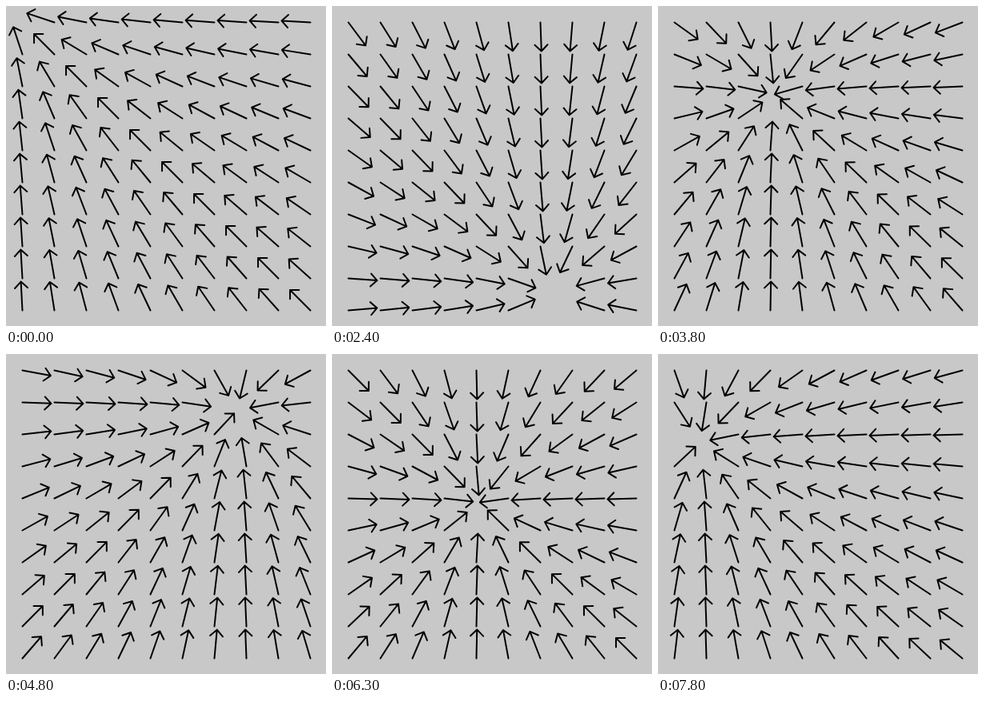
An HTML page with a canvas for the animation above (8 s loop, 400x400 px).

```html
<!DOCTYPE html>
<html>
<head>
<meta charset="utf-8">
<title>Arrow field</title>
<style>
html, body { margin: 0; width: 100%; height: 100%; overflow: hidden; background: #c8c8c8; }
canvas { display: block; }
</style>
</head>
<body>
<canvas width="400" height="400"></canvas>
<script>
const ctx = document.querySelector('canvas').getContext('2d');
const LOOP = 8000, STEP = 100, GAP = 40, LENGTH = 36, HEAD = 8;

// Pointer moves from (0, 0): first step, last step, end point. It rests in between.
const moves = [
  [4, 10, 275, 230], [15, 16, 373, 300], [16, 19, 365, 364], [21, 30, 86.5, 347],
  [32, 38, 145, 110], [38, 40, 185, 62], [43, 48, 288, 70], [48, 52, 300, 306],
  [53, 63, 184, 185], [63, 69, 312, 80], [70, 78, 52, 110]
];

function pointer(step) {
  let x = 0, y = 0;
  for (const [from, to, endX, endY] of moves) {
    const k = Math.min(Math.max((step - from) / (to - from), 0), 1);
    x += (endX - x) * k;
    y += (endY - y) * k;
  }
  return [x, y];
}

function arrow(x, y, angle) {
  ctx.save();
  ctx.translate(x + 0.5, y + 0.5);
  ctx.rotate(angle);
  ctx.beginPath();
  ctx.moveTo(0, 0);
  ctx.lineTo(LENGTH, 0);
  ctx.moveTo(LENGTH - HEAD, -HEAD);
  ctx.lineTo(LENGTH, 0);
  ctx.lineTo(LENGTH - HEAD, HEAD);
  ctx.stroke();
  ctx.restore();
}

function draw() {
  const [mx, my] = pointer(Math.floor(performance.now() % LOOP / STEP));
  ctx.clearRect(0, 0, 400, 400);
  ctx.lineWidth = 2;
  ctx.lineCap = ctx.lineJoin = 'round';
  for (let x = GAP / 2; x < 400; x += GAP) {
    for (let y = GAP / 2; y < 400; y += GAP) {
      // Arrows that would overshoot the pointer are hidden.
      if (Math.hypot(mx - x, my - y) > LENGTH) arrow(x, y, Math.atan2(my - y, mx - x));
    }
  }
  requestAnimationFrame(draw);
}
draw();
</script>
</body>
</html>
```
